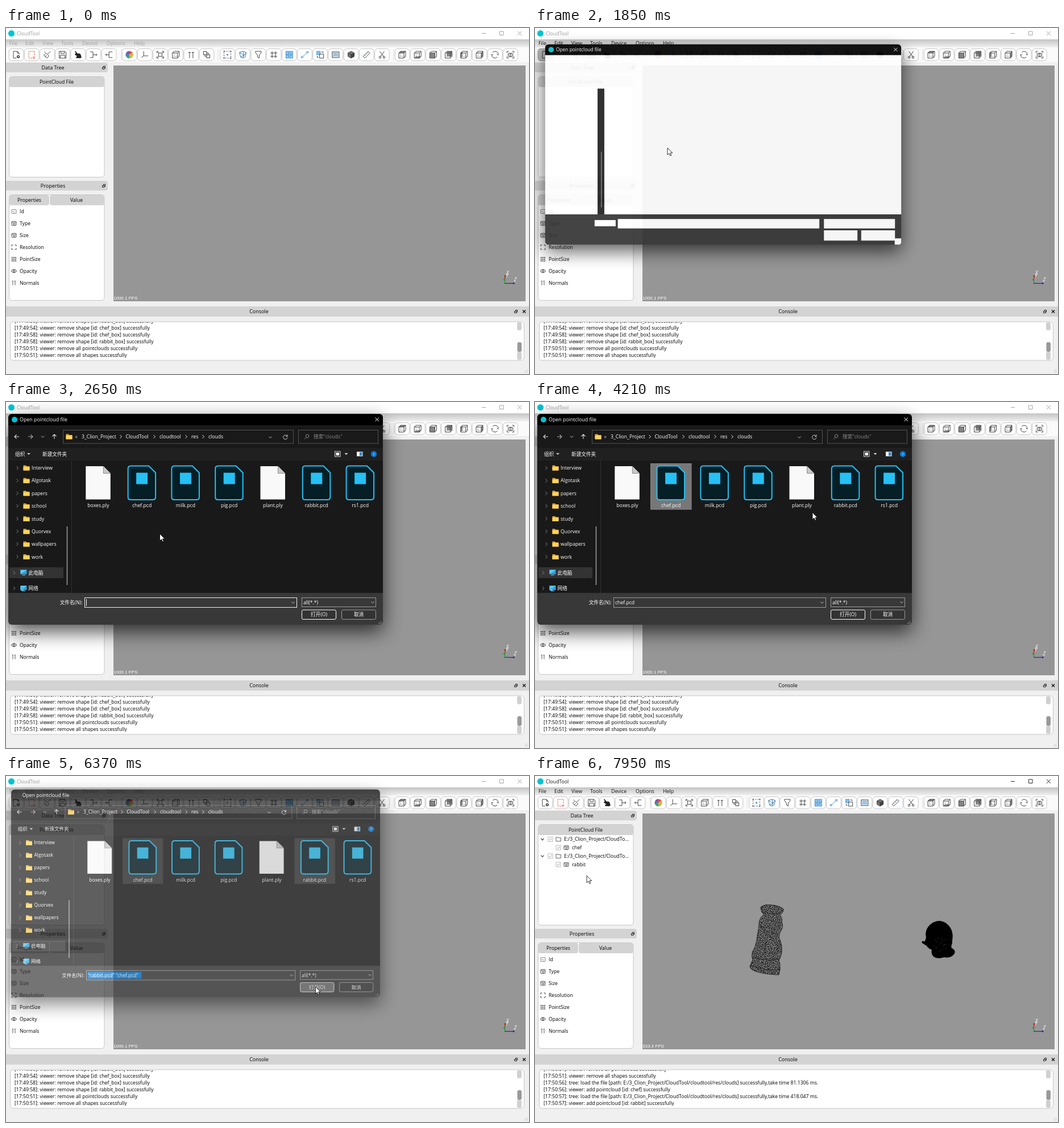
These frames come from a looping animation (920 by 609 pixels, 7990 ms). An HTML page:

```html
<!DOCTYPE html>
<html lang="en">
<head>
<meta charset="utf-8">
<title>Point cloud viewer</title>
<style>
html, body { margin: 0; width: 100%; height: 100%; overflow: hidden; background: #f0f0f0; }
svg { display: block; width: 920px; height: 609px; font: 8.65px "Open Sans", "Noto Sans CJK SC", "Noto Sans CJK", sans-serif; }
text { white-space: pre; }
#dialog { transform-origin: 333.5px 206.5px; }
</style>
</head>
<body>
<svg id="stage" viewBox="0 0 920 609"></svg>
<script>
const LOOP = 7990;
const stage = document.getElementById('stage');

// Markup helpers
const text = (x, y, s, fill = '#000', extra = '') => `<text x="${x}" y="${y + 3.1}" fill="${fill}" ${extra}>${s}</text>`;
const mid = (x, y, s, fill, size = 8.8) => text(x, y, s, fill, `text-anchor="middle" font-size="${size}"`);
const rect = (x, y, x2, y2, fill, extra = '') => `<rect x="${x}" y="${y}" width="${x2 - x}" height="${y2 - y}" fill="${fill}" ${extra}/>`;
const line = (d, stroke = '#333', w = 0.9, extra = '') => `<path d="${d}" fill="none" stroke="${stroke}" stroke-width="${w}" ${extra}/>`;
const shape = (d, fill) => `<path d="${d}" fill="${fill}"/>`;
const dot = (x, y, r, fill, extra = '') => `<circle cx="${x}" cy="${y}" r="${r}" fill="${fill}" ${extra}/>`;
const at = (x, y, body) => `<g transform="translate(${x} ${y})">${body}</g>`;
const when = (spans, body) => `<g data-on="${spans}">${body}</g>`;
const box = (x, y, x2, y2, fill = '#fff', stroke = '#c6c6c6', r = 5) =>
  rect(x + .5, y + .5, x2 - .5, y2 - .5, fill, `stroke="${stroke}" rx="${r}"`);

// Toolbar icons, each drawn around its own centre
const BLUE = '#3a8fd0';
const CUBE = line('M-6-3H3V6H-6ZM-6-3L-3-6H6V3L3 6M3-3L6-6');
const faceCube = d => shape(d, '#888') + CUBE + line('M-3-6V3H6M-3 3L-6 6', '#777', .6);
const square = (x, y, s, fill = 'none', stroke = '#333') => rect(x, y, x + s, y + s, fill, `stroke="${stroke}" stroke-width=".9"`);
const corners = line('M-6-3V-6H-3M3-6H6V-3M6 3V6H3M-3 6H-6V3');
const pageIcon = c => line('M0 6H-5V-6H2L5-3V0M2-6V-3H5', c);
const wheel = ['#e8543f', '#f0a33c', '#a8c545', '#3fa76b', '#3b78c0', '#8a4d9f']
  .map((c, i) => `<path d="M0 0V-6.5A6.5 6.5 0 0 1 5.63-3.25Z" fill="${c}" transform="rotate(${i * 60})"/>`).join('');
const icons = [
  pageIcon('#333') + dot(3.5, 3.5, 2.6, '#333') + line('M2 3.5H5M3.5 2V5', '#fff', .7),
  line('M1 6H-5V-6H5V1', '#d5604c', .9, 'stroke-dasharray="3 1"') + line('M2 3L6 7M6 3L2 7', '#c33'),
  line('M6-6L1-1M-2-3L3 2L0 6L-6 1ZM-3 3L-1 1M-5-5L-3-4'),
  line('M-6-6H4L6-4V6H-6ZM-3-6V-2H3V-6M-4 6V1H4V6'),
  shape('M-6-6L-4-6L-1-2Q4-3 5 1L6 5Q4 7 1 6H-4L-2 2L-6 0L-4-3Z', '#222'),
  line('M-6-5H-1V5H-6M-1 0H6M4-2L6 0L4 2'),
  line('M6-5H0V5H6M0 0H-6M-4-2L-6 0L-4 2'),
  wheel,
  line('M-2-6V2H6M-2 2L-6 5'),
  corners + square(-3, -3, 6) + line('M-5-5L-3-3M5-5L3-3M-5 5L-3 3M5 5L3 3'),
  CUBE + line('M-3-6V3H6M-3 3L-6 6', '#777', .6),
  line('M-3 6V-5M-5-3L-3-5L-1-3M3 6V-5M1-3L3-5L5-3'),
  square(-5.5, -5.5, 5.5) + square(0, 0, 5.5) + line('M-3 0V3H0M0-3H3V0'),
  line('M-6-6H6V6H-6Z', '#333', .9, 'stroke-dasharray="2 2"') + dot(0, 0, 1.5, BLUE) +
    [[-6, -6], [6, 6], [6, -6], [-6, 6]].map(([x, y]) => dot(x, y, 1, '#333')).join(''),
  line('M-6-4L0-6L6-4L4 4L0 6L-4 4ZM-6-4L2 1L6-4M2 1L0 6M-4 4L2 1M0-6L2 1', '#2a6f9f'),
  line('M-5-6H5V-4L1.5 1V6L-1.5 4V1L-5-4Z'),
  line('M-3-6V6M3-6V6M-6-3H6M-6 3H6'),
  [[-6, -6], [.7, -6], [-6, .7], [.7, .7]].map(([x, y]) => square(x, y, 5.3, '#8cc4ec', BLUE)).join(''),
  line('M-4 4L4-4', BLUE) + square(-6, 3, 2.5, '#fff', BLUE) + square(3.5, -5.5, 2.5, '#fff', BLUE),
  square(-6, -6, 6, '#8cc4ec', BLUE) + square(-1, -1, 7, '#fff') + line('M2-5H5V-3M-5 2V5H-3'),
  rect(-6, -5, 6, 5, '#dceaf5', 'stroke="#333" stroke-width=".9"') + line('M-3-3V3M0-3V3M3-3V3M-4-2H4M-4 1H4', BLUE, .7),
  shape('M0-6L5.5-3V3L0 6L-5.5 3V-3Z', '#777') + shape('M0 0L5.5-3V3L0 6Z', '#444') + line('M-5.5-3L0 0L5.5-3M0 0V6M0-6L5.5-3V3L0 6L-5.5 3V-3Z'),
  line('M-6 3L3-6L6-3L-3 6ZM-3.5.5L-2 2M-1-2L.5-.5M1.5-4.5L3-3', '#345'),
  line('M-4-6L2.5 3M4-6L-2.5 3') + dot(-3.5, 4.5, 1.7, 'none', 'stroke="#333"') + dot(3.5, 4.5, 1.7, 'none', 'stroke="#333"'),
  faceCube('M-6-3L-3-6H6L3-3Z'),
  faceCube('M-6 6L-3 3H6L3 6Z'),
  faceCube('M-6-3H3V6H-6Z'),
  faceCube('M-3-6H6V3H-3Z'),
  faceCube('M-6-3L-3-6V3L-6 6Z'),
  faceCube('M3-3L6-6V3L3 6Z'),
  line('M-4-4A5.5 5.5 0 0 1 5.5 1M4 4A5.5 5.5 0 0 1-5.5-1M5.5 1L3.5-1M-5.5-1L-3.5 1'),
  corners + rect(-4, -2.5, 4, 3.5, 'none', 'stroke="#333" rx="1"') + dot(0, .5, 1.6, 'none', 'stroke="#333"')
];
const groups = [[7, 18], [6, 217], [11, 389.5], [8, 697]];
function toolbar() {
  let out = '', n = 0;
  for (const [count, start] of groups) {
    for (let i = 0; i < count; i++, n++) {
      const button = box(-13.3, -11, 13.3, 11.2);
      const lit = n ? '' : when('860-1900', box(-13.3, -11, 13.3, 11.2, '#b8b8b8', '#999'));
      out += at(start + i * 27.2, 47, button + lit + icons[n]);
    }
  }
  for (const x of [203, 373, 682]) out += line(`M${x} 38V57`, '#b5b5b5', 1, 'stroke-dasharray="1 1.5"');
  return out;
}

// Main window
const caption = c => text(19, 9.5, 'CloudTool', c) +
  line('M837 9.5H844M868.5 6H875V12.5H868.5ZM900 6L907 13M907 6L900 13', c, .9);
const menu = c => [['File', 6], ['Edit', 34], ['View', 64], ['Tools', 97], ['Device', 134], ['Options', 177], ['Help', 225]]
  .map(([s, x]) => text(x, 27.3, s, c, 'font-size="8.9"')).join('');
const floatIcon = (x, y) => at(x, y, line('M-2.5-.5H1V2.5H-2.5ZM-.5-.5V-2.5H2.5V1H1', '#222', 1));
const dockTitle = (y, s) => rect(-4, y, 179, y + 17, '#d3d3d3', 'rx="4"') + mid(82.5, y + 8.7, s, '#000', 9) + floatIcon(172, y + 8.7);
const listIcon = rect(-4, -3.5, 4, 3.5, '#fff', 'stroke="#444" rx="1" stroke-width=".9"') + line('M-4-1.5H4M-2 .3H2.5M-2 2H2.5', '#444', .8);
const props = [
  ['Id', rect(-4, -3.5, 4, 3.5, '#fff', 'stroke="#666" rx="1" stroke-width=".8"') + line('M-2-1L-1 0L-2 1M0 1H2', '#555', .7)],
  ['Type', listIcon], ['Size', listIcon],
  ['Resolution', line('M-4-1.5V-4H-1.5M1.5-4H4V-1.5M4 1.5V4H1.5M-1.5 4H-4V1.5')],
  ['PointSize', line('M-4-3H4M-4 0H4M-4 3H4', '#222', 1.7, 'stroke-dasharray="1.7 1.4"')],
  ['Opacity', line('M-5 0Q0-6 5 0Q0 6-5 0Z') + dot(0, 0, 1.7, 'none', 'stroke="#333"')],
  ['Normals', line('M-2 4V-4M-3.5-2.5L-2-4M2 4V-4M.5-2.5L2-4', '#444')]
];
const logLines = [
  '[17:49:50]: viewer: remove shape [id: rabbit_box] successfully',
  '[17:49:54]: viewer: remove shape [id: chef_box] successfully',
  '[17:49:58]: viewer: remove shape [id: chef_box] successfully',
  '[17:49:58]: viewer: remove shape [id: rabbit_box] successfully',
  '[17:50:51]: viewer: remove all pointclouds successfully',
  '[17:50:51]: viewer: remove all shapes successfully',
  '[17:50:56]: tree: load the file [path: E:/3_Clion_Project/CloudTool/cloudtool/res/clouds] successfully,take time 81.1306 ms.',
  '[17:50:56]: viewer: add pointcloud [id: chef] successfully',
  '[17:50:57]: tree: load the file [path: E:/3_Clion_Project/CloudTool/cloudtool/res/clouds] successfully,take time 418.047 ms.',
  '[17:50:57]: viewer: add pointcloud [id: rabbit] successfully'
];
const check = x => rect(x - 4, -4, x + 4, 4, '#fff', 'stroke="#aaa" stroke-width=".8"') + line(`M${x - 2} 0L${x - .5} 2L${x + 2.5}-2`, '#999');
const treeItem = (y, name) =>
  at(0, y, line('M10.5-1.5L13 1.5L15.5-1.5', '#222', 1.1) + check(27) + line('M37-3.5H40L41-2.5H45.5V3.5H37Z', '#555') + text(51, 0, 'E:/3_Clion_Project/CloudTo...')) +
  at(0, y + 14.8, check(41) + at(55, 0, listIcon) + text(65, 0, name));
const fps = s => text(189, 475, `${s} FPS`, '#fff', 'font-size="8" font-family="Liberation Sans, sans-serif"');

let seed = 7;
const random = () => (seed = seed * 16807 % 2147483647) / 2147483647;
// One point per jittered grid cell
function scatter(pitch, x, y, w, h) {
  let d = '';
  for (let j = 0; j < h; j += pitch) {
    for (let i = 0; i < w; i += pitch) {
      d += `M${(x + i + random() * pitch).toFixed(1)} ${(y + j + random() * pitch).toFixed(1)}h1v1h-1z`;
    }
  }
  return d;
}
const CHEF = 'M397 231Q404 225 416 227Q430 228 437 234Q437 241 431 244Q436 252 434 257Q437 264 434 270Q428 280 430 286Q435 297 434 309Q433 319 429 324Q432 333 431 341L429 350Q402 349 388 344Q378 340 378 335L383 323Q379 314 386 303Q390 292 391 280Q394 266 394 258Q396 248 403 244Q397 239 397 231Z';
const RABBIT = 'M688 284C684 266 700 255 711 255C727 256 738 272 734 289C735 298 729 300 735 304Q742 309 736 315Q730 321 720 319Q708 323 701 318Q696 312 698 306Q691 303 689 299L681 294Q679 289 686 291Z';
const clouds =
  `<g clip-path="url(#chef)">${shape(scatter(1.4, 377, 225, 61, 126), '#000')}</g>` +
  line(CHEF, '#000', 1, 'stroke-dasharray="2 1"') +
  line('M399 238Q415 246 434 240M396 262Q400 275 428 279M384 318Q405 326 431 322M380 333Q400 342 430 341M408 290Q402 300 406 312', '#000', 1, 'stroke-dasharray="1.5 1"') +
  shape(RABBIT, '#000') + shape(scatter(6, 700, 284, 24, 24), '#555');

const mainWindow =
  rect(0, 0, 920, 609, '#f0f0f0') + rect(0, 0, 920, 20, '#fff') + rect(0, 20, 920, 36, 'url(#bar)') + rect(0, 34, 920, 60, '#fafafa') +
  dot(9.5, 9.5, 5.5, '#00c4d4') +
  when('0-1270 1760-6420', caption('#999')) + when('1270-1760 6420-7990', caption('#111')) +
  when('0-1270 2300-6750', menu('#a0a0a0')) + when('1270-2300 6750-7990', menu('#111')) +
  toolbar() +
  dockTitle(61, 'Data Tree') + dockTitle(269, 'Properties') +
  when('0-6500 6750-7990', box(5, 85, 173.5, 263)) +
  when('6500-6750', box(5, 85, 173.5, 251.5) + rect(5.5, 257.5, 173, 262.5, '#fff', 'stroke="#c8c8c8"') + rect(5, 257, 89, 263, 'url(#chunk)')) +
  rect(5.5, 86, 173, 104, '#d3d3d3', 'rx="4"') + mid(89, 95.3, 'PointCloud File', '#000', 8.65) +
  when('7200-7990', treeItem(111.3, 'chef') + treeItem(141, 'rabbit')) +
  box(5, 293, 173.5, 480) + rect(5.5, 294, 76, 312, '#d3d3d3', 'rx="4"') + rect(77, 294, 173, 312, '#d3d3d3', 'rx="4"') +
  mid(41, 303.3, 'Properties', '#000', 8.7) + mid(124, 303.3, 'Value', '#000', 8.7) +
  props.map(([s, icon], i) => at(14, 323 + i * 20.95, icon + text(10, 0, s))).join('') +
  rect(189, 66, 914, 481, '#969696') +
  line('M877.5 449.5V436', '#20a030', 1.3) + line('M878 441V435', '#d33', 1.4) + line('M877 449.5H893', '#2222cc', 1.2) +
  dot(878, 436.5, 1.6, '#c22') + dot(876.5, 443, 1.6, '#1a9a30') + dot(893, 449.5, 1.6, '#2222cc') +
  text(880, 431, 'X', '#fff', 'font-style="italic"') + text(879, 435.5, 'Y', '#fff', 'font-style="italic"') + text(893.5, 443, 'Z', '#fff', 'font-style="italic"') +
  when('0-7200', fps('1000.1')) + when('7200-7990', fps('333.3') + clouds) +
  rect(0, 490, 920, 508, '#d3d3d3') + mid(445, 499.3, 'Console', '#000', 9) + floatIcon(897, 499) + line('M909 496.5L914 501.5M914 496.5L909 501.5', '#111', 1.3) +
  box(7, 516.5, 912, 585.5) +
  `<g clip-path="url(#console)"><g id="log">${logLines.map((s, i) => text(15, 516.2 + i * 11.85, s)).join('')}</g></g>` +
  rect(899, 518, 907, 532, '#d0d0d0', 'rx="3"') + rect(899, 570, 907, 584, '#d0d0d0', 'rx="3"') + rect(899.5, 553, 907, 570, '#999', 'rx="3"') +
  line('M912 606L917 601M915 607L918 604', '#bbb', 1);

// File dialog
const folder = (x, y) => at(x, y, shape('M-5.5-4.5H-1L.5-3H5.5V4.5H-5.5Z', '#e0a22a') + shape('M-5.5-2H5.5V4.5H-5.5Z', '#ffd45e'));
const chevron = (x, y, c = '#888') => line(`M${x - 1.5} ${y - 3}L${x + 1.5} ${y}L${x - 1.5} ${y + 3}`, c, 1);
const down = (x, y) => line(`M${x - 2.7} ${y - 1.3}L${x} ${y + 1.4}L${x + 2.7} ${y - 1.3}`, '#ccc', .9);
const field = (x, y, x2, y2, stroke) => rect(x + .5, y + .5, x2 - .5, y2 - .5, 'none', `stroke="${stroke}"`);
const dialogButton = (x, x2, s, stroke, fill = '#333') => rect(x, 366, x2, 382.5, fill, `stroke="${stroke}" rx="2.5"`) + mid((x + x2) / 2, 374.3, s, '#fff', 8.6);
const tile = (i, fill, stroke = fill) => rect(203.5 + 76.8 * (i - 1), 108.5, 275 + 76.8 * (i - 1), 189, fill, `stroke="${stroke}"`);
const files = ['boxes.ply', 'chef.pcd', 'milk.pcd', 'pig.pcd', 'plant.ply', 'rabbit.pcd', 'rs1.pcd'];
const blankPage = shape('M-22-29.5H9L21.5-17V29H-22Z', '#f9f9f9') + shape('M9-29.5L21.5-17H9Z', '#c8c8c8') + line('M9-29.5V-17H21.5', '#666', .7);
const imagePage = `<path d="M-20-30H12L24-18V25Q24 29.5 19 29.5H-20Q-24.5 29.5-24.5 25V-25Q-24.5-30-20-30Z" fill="#061e26" stroke="#26c0f4" stroke-width="2"/>` +
  rect(-10, -18, 10, 2, '#26c0f4');
const fileIcon = (name, i) => at(162.3 + 76.8 * i, 142.5, (name.endsWith('ply') ? blankPage : imagePage) + mid(0, 39.7, name, '#fff', 8.7));
const places = ['Interview', 'Algotask', 'papers', 'school', 'study', 'Quorvex', 'wallpapers', 'work'];
const crumbs = [['3_Clion_Project', 133, 202], ['CloudTool', 210.5, 261], ['cloudtool', 270, 317], ['res', 326, 347], ['clouds', 356, 0]];
const monitor = (x, y) => at(x, y, rect(-5.5, -4.5, 5.5, 3, '#28a4e0') + shape('M-5.5-4.5H5.5L-5.5 3Z', '#5cccf4') + line('M-3 4.5H3', '#9ad', 1.2));

const content =
  rect(4, 41, 663, 336, '#191919') + rect(4, 81, 663, 103, '#202020') + rect(4, 336, 663, 387, '#383838') + rect(4, 380, 663, 392, '#383838', 'rx="6"') +
  line('M23 61H15M18.5 57.5L15 61L18.5 64.5M81.5 60.5L85 57L88.5 60.5M85 57V65', '#ddd', 1.1) +
  line('M39 61H47M43.5 57.5L47 61L43.5 64.5', '#aaa', 1.1) + down(64.5, 61) +
  field(100, 49, 506, 73.5, '#535353') + field(514, 49, 655, 73.5, '#535353') + folder(111, 61) + text(121.5, 60.5, '«', '#ccc') +
  crumbs.map(([s, x, next]) => text(x, 61, s, '#fff') + (next ? chevron(next, 61, '#ddd') : '')).join('') +
  down(465, 62) + line('M494.5 60A3.7 3.7 0 1 0 495 62.5M495 57.5V60.5H492', '#ccc', 1) +
  dot(530, 60, 2.8, 'none', 'stroke="#888"') + line('M528 62.5L525 65.5', '#888', 1) + text(541, 61, '搜索"clouds"', '#8a8a8a') +
  text(16, 91.5, '组织', '#fff') + shape('M37 90H43L40 93Z', '#ccc') + text(64, 91.5, '新建文件夹', '#fff') +
  rect(578.5, 87, 588, 96, '#222', 'stroke="#ddd"') + rect(580.5, 89, 586, 94, '#fff') + shape('M595.5 90H601.5L598.5 93Z', '#ddd') +
  rect(617, 87.5, 627.5, 95.5, '#f4f4f4') + rect(622, 88.5, 626.5, 94.5, '#2a86d0') + dot(647, 91.5, 5.2, '#0a78d4') + mid(647, 91.5, '?', '#fff', 8) +
  places.map((s, i) => { const y = 116 + i * 22.35; return chevron(20, y) + folder(36, y) + text(45, y, s, '#fff'); }).join('') +
  rect(6, 291, 101, 310, '#333') + chevron(14.5, 300.5) + monitor(31, 300) + text(39.5, 300.5, '此电脑', '#fff') +
  chevron(14.5, 328) + monitor(31, 328) + dot(28.5, 329.5, 3, '#4fb4e8') + text(39.5, 328, '网络', '#fff') +
  line('M115.5 104V336', '#303030', 1) + line('M107.5 219V322', '#a0a0a0', 1.5) +
  when('2900-3100', tile(1, '#4d4d4d')) + when('3100-6010', tile(1, '#777', '#888')) + when('6010-7990', tile(1, '#363636')) +
  when('3850-3970', tile(2, '#4d4d4d')) + when('3970-4070', tile(3, '#4d4d4d')) +
  when('4400-4960', tile(5, '#4d4d4d')) + when('4960-6010', tile(5, '#777', '#999')) + when('6010-7990', tile(5, '#363636')) +
  files.map(fileIcon).join('') +
  text(134.5, 353, '文件名(N):', '#fff', 'text-anchor="end"') +
  when('0-3100', field(138, 344, 512, 362, '#f0f0f0')) + when('3100-7990', field(138, 344, 512, 362, '#9b9b9b')) + down(505, 353) +
  when('1930-2200 2550-3080', line('M141.5 347V359', '#fff', 1)) +
  when('3100-5130', text(141, 353, 'chef.pcd', '#fff')) +
  when('6010-7990', rect(141, 347, 237, 359, '#0078d7')) + when('5130-7990', text(141, 353, '"rabbit.pcd" "chef.pcd"', '#fff')) +
  field(520, 344, 651, 361, '#9b9b9b') + text(523, 352.7, 'all(*.*)', '#fff') + down(645, 352.5) +
  dialogButton(520.5, 580.5, '打开(O)', '#fff') + when('5800-7990', dialogButton(520.5, 580.5, '打开(O)', '#ccc', '#686868')) +
  dialogButton(590.5, 650.5, '取消', '#9b9b9b') +
  line('M655 389.5H661M658 387H661', '#999', 1.3, 'stroke-dasharray="1.3 1.2"');

const blank =
  rect(4, 41, 663, 336, '#fff') + rect(101, 103, 113.5, 336, '#202020') + line('M108 220V323', '#8c8c8c', 1.3) +
  rect(4, 336, 663, 387, '#353535') + rect(4, 380, 663, 392, '#353535', 'rx="6"') +
  rect(95.5, 346.5, 134.5, 358, '#fff') + rect(138.5, 344.5, 511.5, 362, '#fff') + rect(520, 344.5, 651.5, 362, '#fff') +
  rect(520, 365.5, 582, 384.5, '#fff') + rect(589, 365.5, 651.5, 384.5, '#fff') + shape('M651 380.5H663V387Q663 392 658 392H651Z', '#fff');

const dialog = `<g id="dialog">` +
  rect(4, 34, 663, 404, '#000', 'rx="8" opacity=".7" filter="url(#soft)"') +
  rect(4, 21, 663, 60, '#000', 'rx="6"') +
  when('0-1930', blank) + when('1930-7990', content) +
  text(24, 31, 'Open pointcloud file', '#fff', 'font-size="8.85"') +
  when('0-6310', dot(15, 31, 5, '#00c4d4') + line('M649.5 27.5L656 34M656 27.5L649.5 34', '#fff', 1)) + '</g>';

stage.innerHTML = `<defs>
  <linearGradient id="bar" x2="0" y2="1"><stop stop-color="#c4c4c4"/><stop offset="1" stop-color="#f6f6f6"/></linearGradient>
  <linearGradient id="chunk"><stop stop-color="#d8d8d8"/><stop offset=".5" stop-color="#606060"/><stop offset="1" stop-color="#d8d8d8"/></linearGradient>
  <filter id="soft" x="-10%" y="-20%" width="120%" height="140%"><feGaussianBlur stdDeviation="17"/></filter>
  <clipPath id="console"><rect x="8" y="518" width="890" height="62.5"/></clipPath>
  <clipPath id="chef"><path d="${CHEF}"/></clipPath></defs>` +
  mainWindow + dialog +
  `<g id="cursor"><path d="M0 0V12.3L2.9 9.7L4.9 14L6.8 13.2L4.9 8.9H8.8Z" fill="#fff" stroke="#000" stroke-width=".8"/></g>`;

// Timelines: [ms, ...values], eased between neighbours
const cursorPath = [
  [40, 389, 478], [590, 31, 87], [740, 30, 85], [1020, 17, 42], [1410, 17, 42], [1850, 233, 211], [2180, 262, 226],
  [2650, 270.5, 232], [2800, 290, 205], [3010, 246, 145], [3300, 246, 145], [3750, 283, 162], [3850, 288, 165],
  [4210, 488, 194.5], [4630, 538, 179], [4710, 536, 178], [5130, 536, 178], [5910, 544.5, 371],
  [6420, 544.5, 371], [6540, 538, 370], [6790, 237, 265], [6950, 208, 240], [7200, 208, 240], [7950, 91, 175.5]
];
const dialogPath = [[1780, .9, 0], [1850, .95, .92], [2000, 1, 1], [6310, 1, 1], [6510, .95, 0]];

function sample(path, t, ease) {
  const i = path.findIndex(p => p[0] > t);
  if (i <= 0) return (i ? path[path.length - 1] : path[0]).slice(1);
  const a = path[i - 1], b = path[i], k = ease((t - a[0]) / (b[0] - a[0]));
  return a.slice(1).map((v, j) => v + (b[j + 1] - v) * k);
}
const linear = k => k;
const smooth = k => k * k * (3 - 2 * k);

const toggles = [...stage.querySelectorAll('[data-on]')].map(el =>
  ({ el, spans: el.dataset.on.split(' ').map(s => s.split('-').map(Number)) }));
const [cursorEl, dialogEl, logEl] = ['cursor', 'dialog', 'log'].map(id => document.getElementById(id));
const start = performance.now();

function draw() {
  const t = Math.max(0, performance.now() - start) % LOOP;
  for (const { el, spans } of toggles) el.style.display = spans.some(([a, b]) => t >= a && t < b) ? '' : 'none';

  const [x, y] = sample(cursorPath, t, smooth);
  cursorEl.setAttribute('transform', `translate(${x} ${y})`);
  cursorEl.style.display = t < 40 ? 'none' : '';

  const [scale, alpha] = sample(dialogPath, t, linear);
  const drift = t < 3000 ? (scale - 1) * 50 : 0;
  dialogEl.style.transform = `translate(${-drift * -1}px, ${drift * .6}px) scale(${scale})`;
  dialogEl.style.opacity = alpha;
  dialogEl.style.display = alpha ? '' : 'none';

  const scrolled = t < 6750 ? 0 : t < 7200 ? 2 : 4;
  logEl.setAttribute('transform', `translate(0 ${-11.85 * scrolled})`);
  requestAnimationFrame(draw);
}
draw();
</script>
</body>
</html>
```
